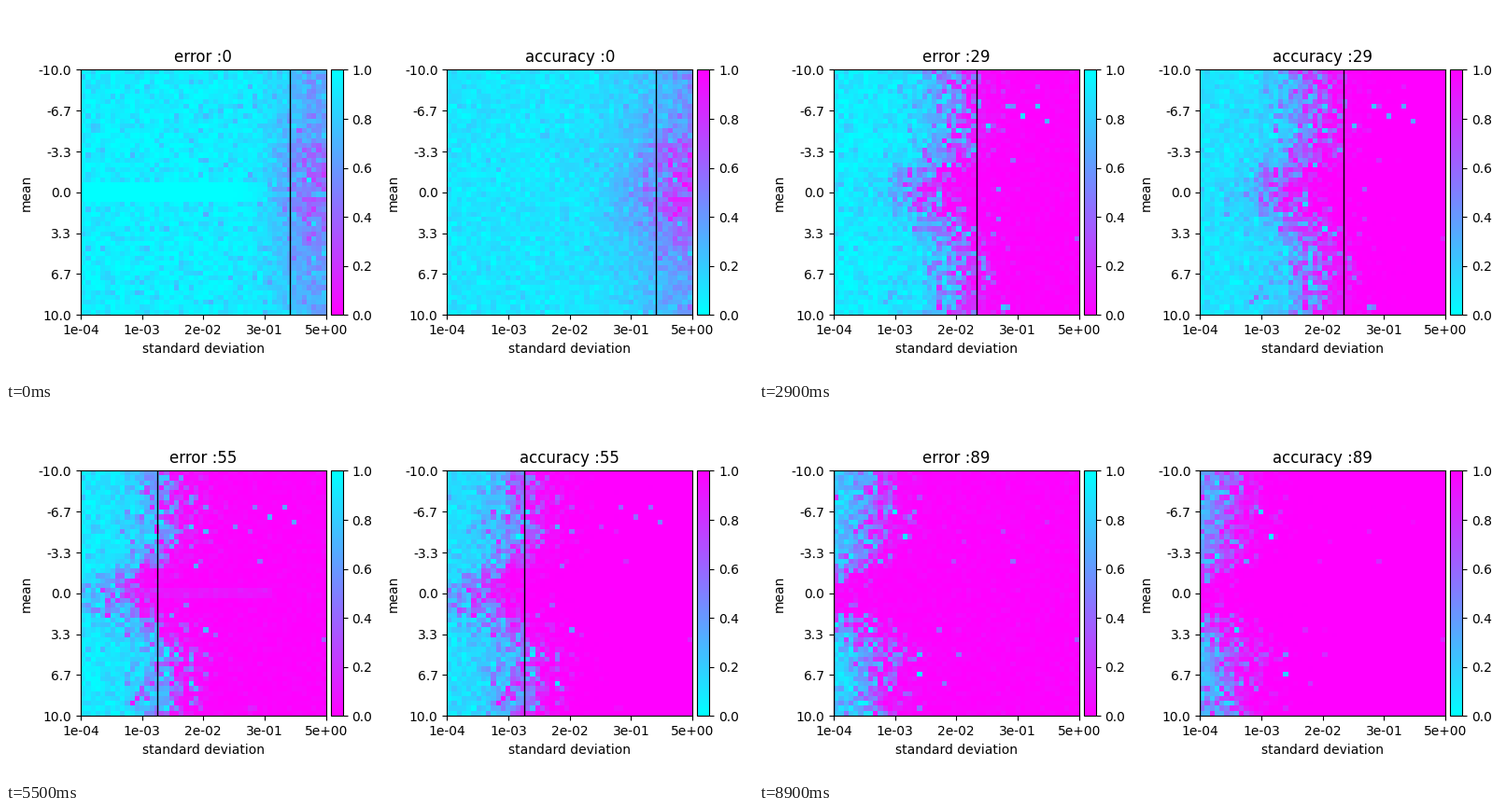
A matplotlib script for the animation above (9000 ms loop, 800 by 400 pixels).

```python
import numpy as np
import matplotlib.pyplot as plt
from matplotlib.animation import FuncAnimation
from mpl_toolkits.axes_grid1 import make_axes_locatable

N = 50
FRAMES = 90

rng = np.random.default_rng(7)
X, M = np.meshgrid(np.arange(N), np.linspace(-10, 10, N))
NEAR = np.exp(-(M / 2.8) ** 2)
WIDE = np.exp(-(M / 5) ** 2)

# Fixed traits of every cell
shift = rng.normal(0, 3.4, (N, N))
shift += (rng.random((N, N)) < 0.06) * rng.exponential(6, (N, N))
stuck = (rng.random((N, N)) < 0.007) * rng.uniform(0.15, 0.5, (N, N))
grain_err = np.abs(rng.normal(0, 0.1, (N, N)))
grain_acc = rng.normal(0, 0.05, (N, N))
speck = np.abs(rng.normal(0, 0.02, (N, N)))
spread = 1 + 0.3 * rng.normal(0, 1, (N, N))

# Starting state, before any training
dip = 0.48 * np.exp(-((X - 47) / 7.5) ** 2) * (0.5 + 0.5 * WIDE)
lift = 0.75 / (1 + np.exp((41 - X) / 4.5)) * (0.35 + 0.65 * WIDE)
start_err = 1 - dip * spread
start_acc = 0.1 + lift * spread


def untrained(t, outer, middle, jitter, tail):
    """Share of each cell left of the boundary, which sweeps to the left.

    outer and middle give the boundary's start and speed in those rows.
    """
    (a, va), (b, vb) = outer, middle
    edge = a - va * t
    edge += (b - vb * t - edge) * NEAR + 30 * np.exp(-t / 5)
    z = edge - X + jitter
    return 1 / (1 + np.exp(-z / np.where(z > 0, 3.4, tail)))


def fields(t):
    fresh = np.random.default_rng(1000 + t)
    jitter = shift + fresh.normal(0, 0.6, (N, N))
    held = stuck * min(t / 15, 1)

    u = untrained(t, (33.5, 0.29), (27.5, 0.37), jitter, 1.8)
    flat = (np.abs(M) < 0.7) & (X < 38)
    calm = np.where(flat, min(t / 8, 1), 1)
    err = (start_err - grain_err * calm) * u + speck * (1 - u)
    pulse = max(0, np.cos(2 * np.pi * (t - 21) / 34)) * (1 - t / (FRAMES - 1))
    err += 0.17 * pulse * (1 - u) * (np.abs(M) < 0.5) * (X < 39)
    err = np.maximum(err, held)

    v = untrained(t, (31, 0.3), (25, 0.36), jitter, 2.4)
    acc = (start_acc + grain_acc) * v + 1 - v
    acc = np.minimum(acc, 1 - 0.4 * held)
    return np.clip(err, 0, 1), np.clip(acc, 0, 1)


def panel(ax, name, cmap):
    im = ax.imshow(np.zeros((N, N)), cmap=cmap, vmin=0, vmax=1)
    line = ax.axvline(0, color="black", lw=1)
    ax.set_xlim(-0.5, N - 0.5)
    ax.set_xticks(np.linspace(-0.5, N - 0.5, 5),
                  ["1e-04", "1e-03", "2e-02", "3e-01", "5e+00"])
    ax.set_yticks(np.linspace(-0.5, N - 0.5, 7),
                  [f"{m:.1f}" for m in np.linspace(-10, 10, 7)])
    ax.set_xlabel("standard deviation")
    ax.set_ylabel("mean")
    ax.set_title(f"{name} :0")
    cax = make_axes_locatable(ax).append_axes("right", size="5%", pad=0.05)
    fig.colorbar(im, cax=cax)
    return ax, name, im, line


fig, (left, right) = plt.subplots(1, 2, figsize=(8, 4), dpi=100)
panels = [panel(left, "error", "cool_r"), panel(right, "accuracy", "cool")]
for _ in range(2):  # the second pass settles the margins
    fig.tight_layout()


def update(t):
    x = np.interp(t, [0, 21, 37, 55, 89], [42.1, 31.5, 25.8, 15.2, -0.5])
    for (ax, name, im, line), data in zip(panels, fields(t)):
        im.set_data(data)
        line.set_xdata([x, x])
        ax.set_title(f"{name} :{t}")


anim = FuncAnimation(fig, update, frames=FRAMES, interval=100,
                     repeat=True, repeat_delay=0)
plt.show()
```
